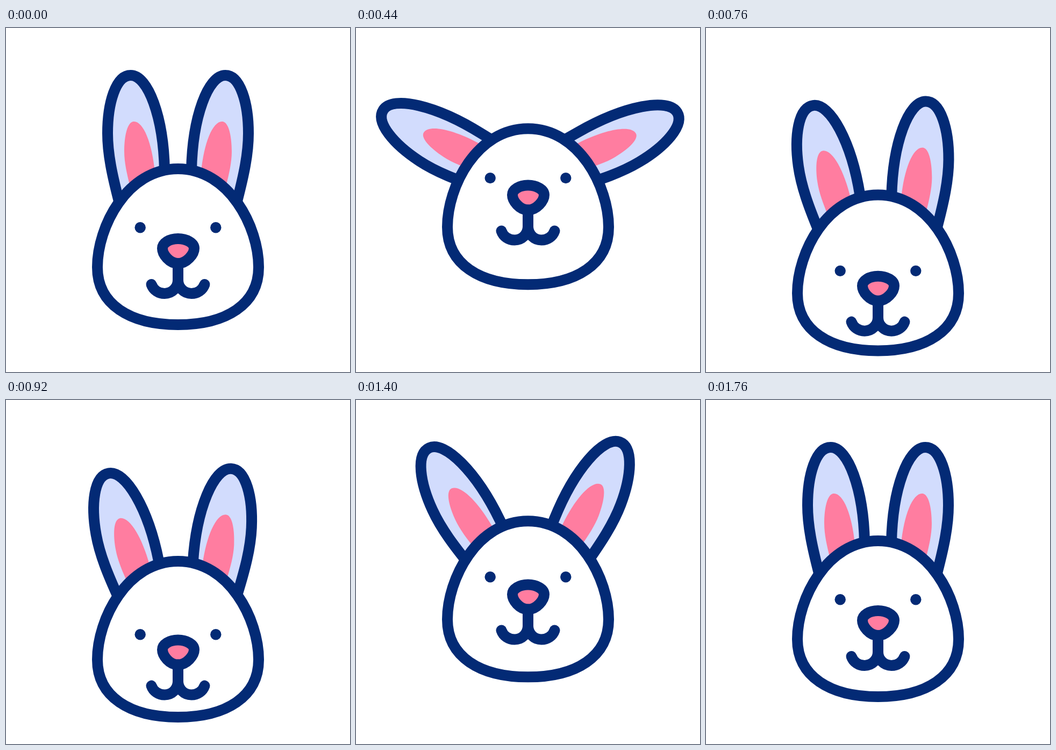
These frames come from a looping animation (640 px wide and 640 px high, 2000 ms). An HTML page with a canvas:

```html
<!DOCTYPE html>
<html lang="en">
<head>
<meta charset="utf-8">
<title>Rabbit</title>
<style>
  html, body { margin: 0; width: 100%; height: 100%; overflow: hidden; background: #fff; }
  canvas { display: block; width: 640px; height: 640px; }
</style>
</head>
<body>
<canvas id="stage"></canvas>
<script>
const SIZE = 640, LOOP = 2000, STEP = 40;
const NAVY = '#032a75', PALE = '#d2dcfd', PINK = '#ff7da0', WHITE = '#fff';

const canvas = document.getElementById('stage');
const ctx = canvas.getContext('2d');
const dpr = window.devicePixelRatio || 1;
canvas.width = canvas.height = SIZE * dpr;

const head = new Path2D(
  'M320 262 C225 262 170 370 170 445 C170 514 230 552 320 552 ' +
  'C410 552 470 514 470 445 C470 370 415 262 320 262 Z');
const ear = new Path2D(
  'M297 340 L295 265 C293 165 264 88 232 88 C204 88 189 140 189 196 ' +
  'C189 235 198 275 209 318 L216 345 Z');
const earPink = new Path2D(
  'M238 174 C256 174 272 215 277 268 L280 312 L235 312 L231 295 ' +
  'C225 272 220 250 220 230 C220 200 226 174 238 174 Z');
const nose = new Path2D(
  'M320 392 C336 392 350 400 350 410 C350 421 336 438 320 438 ' +
  'C304 438 291 421 291 410 C291 400 304 392 320 392 Z');
const mouth = new Path2D(
  'M320 438 L320 469 A25 25 0 0 1 295 494 C284 494 274 487.5 270.5 477 ' +
  'M320 469 A25 25 0 0 0 345 494 C356 494 366 487.5 369.5 477');

// Symmetric ease in and out, cubic-bezier(.42, 0, .58, 1)
function ease(x) {
  let lo = 0, hi = 1, s = x;
  for (let i = 0; i < 24; i++) {
    s = (lo + hi) / 2;
    const r = 1 - s;
    if (3 * s * r * r * 0.42 + 3 * s * s * r * 0.58 + s * s * s < x) lo = s; else hi = s;
  }
  return s * s * (3 - 2 * s);
}

// Value at time t through eased stops
function track(t, times, values) {
  for (let i = 1; i < times.length; i++) {
    if (t < times[i]) {
      const k = ease((t - times[i - 1]) / (times[i] - times[i - 1]));
      return values[i - 1] + (values[i] - values[i - 1]) * k;
    }
  }
  return values[values.length - 1];
}

const BODY = [0, 400, 800, 1267, 1733];
const FACE = [0, 367, 767, 1360, 1733];

function outline(path, fill) {
  if (fill) {
    ctx.fillStyle = fill;
    ctx.fill(path);
  }
  ctx.stroke(path);
}

function drawEar(angle, px, py, mirror) {
  ctx.save();
  if (mirror) {
    ctx.translate(SIZE, 0);
    ctx.scale(-1, 1);
  }
  ctx.translate(px, py);
  ctx.rotate(-angle * Math.PI / 180);
  ctx.translate(-px, -py);
  ctx.fillStyle = PALE;
  ctx.fill(ear);
  ctx.fillStyle = PINK;
  ctx.fill(earPink);
  ctx.stroke(ear);
  ctx.restore();
}

function drawEyes(dy) {
  ctx.fillStyle = NAVY;
  for (const x of [249.7, 390.3]) {
    ctx.beginPath();
    ctx.arc(x, 371.2 + dy, 10.2, 0, Math.PI * 2);
    ctx.fill();
  }
}

function draw(t) {
  ctx.setTransform(dpr, 0, 0, dpr, 0, 0);
  ctx.fillStyle = WHITE;
  ctx.fillRect(0, 0, SIZE, SIZE);
  ctx.strokeStyle = NAVY;
  ctx.lineWidth = 20;
  ctx.lineCap = ctx.lineJoin = 'round';

  ctx.translate(0, track(t, BODY, [0, -77.3, 51, -44.2, 0]));
  drawEar(track(t, BODY, [0, 57.8, 7, 29.8, 0]), 270, 325, false);
  drawEar(track(t, BODY, [0, 60.3, -1, 25, 0]), 264, 327, true);
  outline(head, WHITE);

  drawEyes(track(t, FACE, [0, -20.9, 32.2, -5.3, 0]));
  ctx.translate(0, track(t, FACE, [0, -28, 21.2, -12, 0]));
  outline(nose, PINK);
  outline(mouth);
}

const start = performance.now();
function tick() {
  const t = (performance.now() - start) % LOOP;
  draw(Math.floor(t / STEP) * STEP);
  requestAnimationFrame(tick);
}
tick();
</script>
</body>
</html>
```
